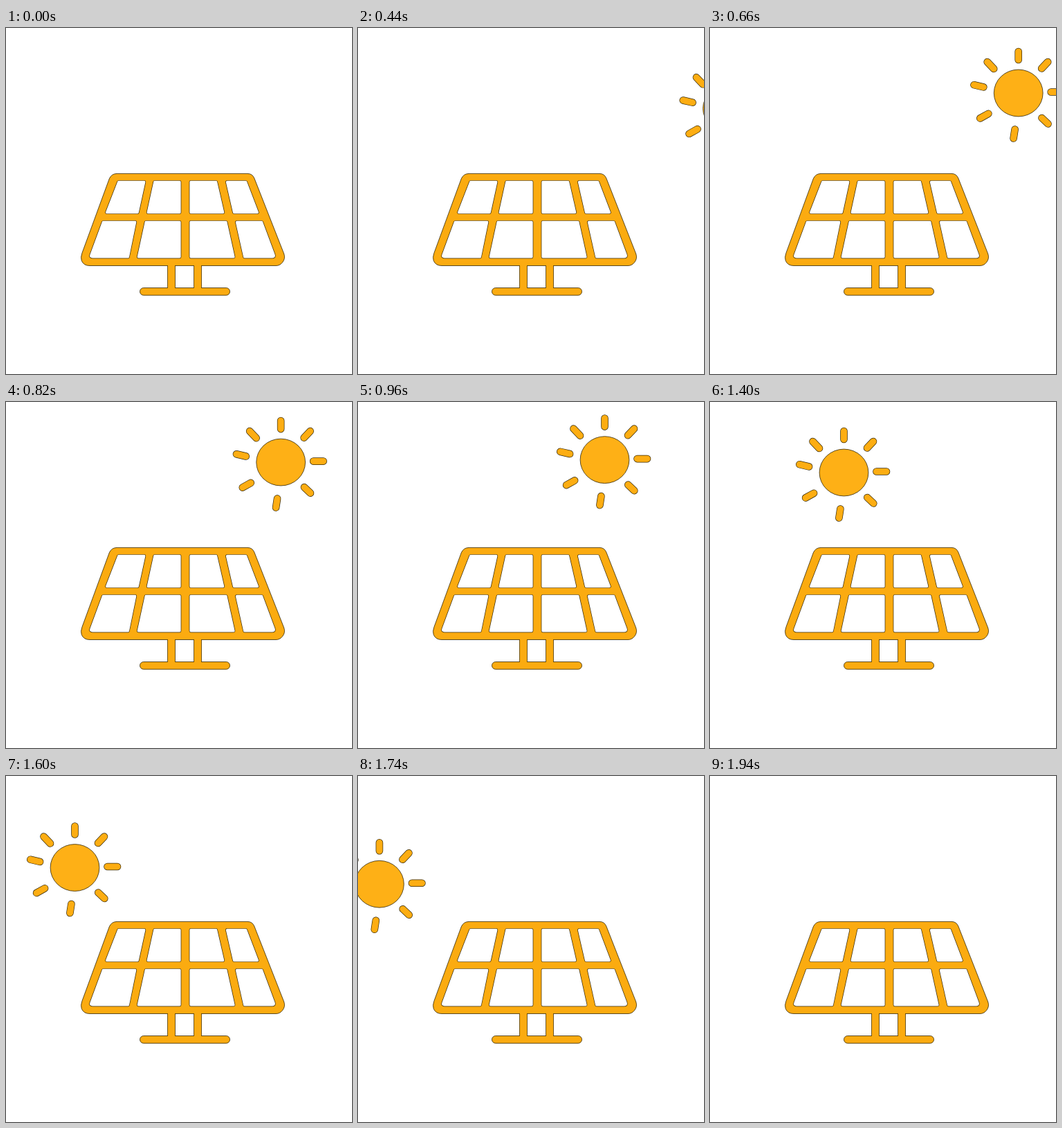
An HTML page that plays this animation: 500 px wide and 500 px high, repeating every 2.04 s.

```html
<!DOCTYPE html>
<html lang="en">
<head>
<meta charset="utf-8">
<title>Sun over a solar panel</title>
<style>
  html, body { margin: 0; width: 100%; height: 100%; overflow: hidden; background: #fff; }
  svg { display: block; width: 100vw; height: 100vh; }
  .edged { stroke: #33270a; stroke-width: .8; }
  .panel { fill: #fbab10; }
  .disc { fill: #feb016; }
  .rays { fill: none; stroke-linecap: round; }
  .rays .edge { stroke: #33270a; stroke-width: 10.6; }
  .rays .face { stroke: #fdad12; stroke-width: 9.2; }
  .cells { stroke-linejoin: round; }
  .cells .edge { fill: #33270a; stroke: #33270a; stroke-width: 4.7; }
  .cells .face { fill: #fff; stroke: #fff; stroke-width: 3.3; }
</style>
</head>
<body>
<svg viewBox="0 0 500 500">
  <defs>
    <path id="rays" d="M0-60V-48 M33.5-35.5L42.5-45 M47-1.5H61.5 M33.8 36L42.8 44.5
      M-5.1 52.5L-7.1 65.5 M-55.4 36.5L-43.4 29.8 M-64.2-11.8L-50.4-8.6 M-45-45L-35.5-35"/>
    <path id="cells" d="M162.7 222.5H199.8L190.2 266.5H145.6Z M214.8 222.5H251V266.5H205.2Z
      M267 222.5H303.6L313.7 266.5H267Z M319.4 222.5H346.6L363.4 266.5H329.5Z
      M140.4 280.5H186.7L176.4 330.8H125Q121.8 330.8 122.9 328Z M202.2 280.5H251V330.8H191.3Z
      M267 280.5H317.9L329 330.8H267Z M333.4 280.5H369.5L387 327.5Q388.3 330.8 385 330.8H344.7Z"/>
  </defs>

  <g class="panel edged">
    <path d="M233.5 343V377H244.5V343Z M271.5 343V377H282.5V343Z"/>
    <rect x="193.5" y="375.5" width="130" height="10.7" rx="5.3"/>
    <path d="M160 210.4H349Q356 210.4 358.8 217L401.6 326Q404.2 333 399.5 338.8Q395.8 343.5 390 343.5H121Q112.5 343.5 109.3 336.5Q107.5 331.5 109.8 325.5L149.2 218Q152 210.8 160 210.4Z"/>
    <path d="M233.9 342V378H244.1V342Z M271.9 342V378H282.1V342Z" stroke="none"/>
  </g>
  <g class="cells">
    <use href="#cells" class="edge"/>
    <use href="#cells" class="face"/>
  </g>

  <g id="sun" visibility="hidden">
    <ellipse class="disc edged" rx="35.4" ry="33.9"/>
    <g class="rays">
      <use href="#rays" class="edge"/>
      <use href="#rays" class="face"/>
    </g>
  </g>
</svg>
<script>
  const LOOP = 2040, STEP = 20, RISE = 360, SET = 1940;
  const sun = document.getElementById('sun');

  // time, x, y along the sun's arc
  const arc = [
    [360, 567, 125], [660, 445.7, 94], [880, 380, 85.3], [960, 356.5, 83.6], [1030, 333, 83],
    [1120, 300.5, 85], [1400, 193.5, 102], [1600, 99.5, 132.5], [1940, -68, 191]
  ];

  function slope(i, k) {
    const a = arc[Math.max(i - 1, 0)], b = arc[Math.min(i + 1, arc.length - 1)];
    return (b[k] - a[k]) / (b[0] - a[0]);
  }

  // cubic Hermite between neighbouring points
  function along(t, k) {
    const i = arc.findIndex(p => p[0] > t) - 1;
    const a = arc[i], b = arc[i + 1], d = b[0] - a[0], u = (t - a[0]) / d, v = 1 - u;
    return v * v * (1 + 2 * u) * a[k] + u * u * (1 + 2 * v) * b[k]
      + d * u * v * (v * slope(i, k) - u * slope(i + 1, k));
  }

  function draw() {
    const t = Math.floor(performance.now() % LOOP / STEP) * STEP;
    const up = t >= RISE && t < SET;
    sun.setAttribute('visibility', up ? 'visible' : 'hidden');
    if (up) {
      sun.setAttribute('transform', `translate(${along(t, 1).toFixed(2)} ${along(t, 2).toFixed(2)})`);
    }
    requestAnimationFrame(draw);
  }
  draw();
</script>
</body>
</html>
```
